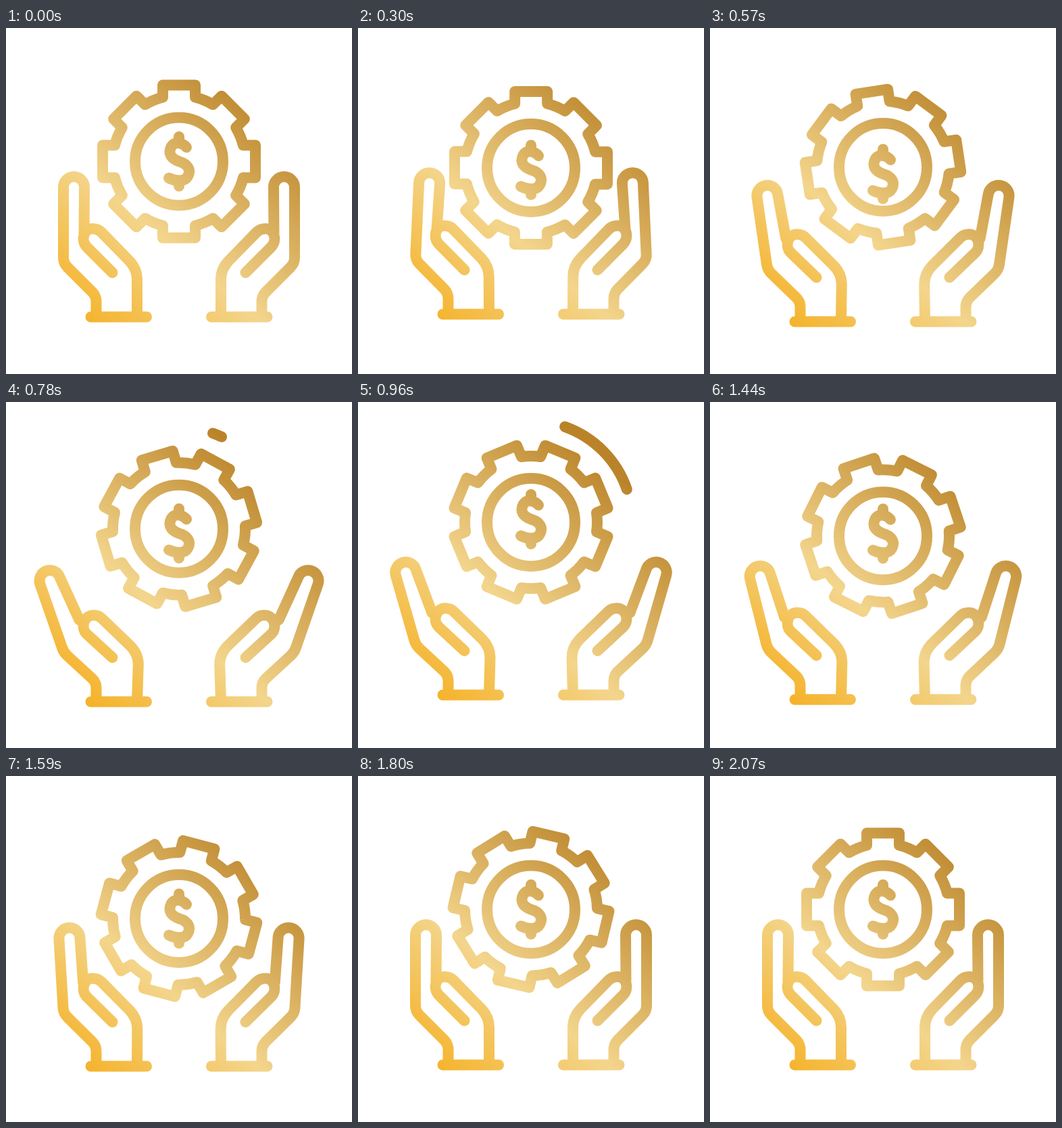
An HTML page with a canvas that plays this animation: 512 by 512 pixels, repeating every 2.25 s.

```html
<!DOCTYPE html>
<html lang="en">
<head>
<meta charset="utf-8">
<title>Hands tossing a coin gear</title>
<style>
html, body { margin: 0; width: 100%; height: 100%; overflow: hidden; background: #fff; }
canvas { display: block; }
</style>
</head>
<body>
<canvas id="stage" width="512" height="512"></canvas>
<script>
const ctx = document.getElementById('stage').getContext('2d');
const LOOP = 2250, STEP = 30, CX = 256, DEG = Math.PI / 180;

const gold = ctx.createLinearGradient(-166, 194, 110, -129);
gold.addColorStop(0, '#f5b32b');
gold.addColorStop(0.4, '#f3d58c');
gold.addColorStop(1, '#ba8329');

// Smooth curve through [time, value] keys without overshoot.
function track(keys) {
  const slope = i => (keys[i + 1][1] - keys[i][1]) / (keys[i + 1][0] - keys[i][0]);
  const tangent = i => {
    if (i === 0 || i === keys.length - 1) return 0;
    const a = slope(i - 1), b = slope(i);
    return a * b > 0 ? 2 * a * b / (a + b) : 0;
  };
  return t => {
    const last = keys.length - 1;
    if (t <= keys[0][0]) return keys[0][1];
    if (t >= keys[last][0]) return keys[last][1];
    const i = keys.findIndex(k => k[0] > t) - 1;
    const [t0, v0] = keys[i], [t1, v1] = keys[i + 1];
    const d = t1 - t0, u = (t - t0) / d, w = 1 - u;
    return v0 * w * w * (1 + 2 * u) + v1 * u * u * (3 - 2 * u)
      + d * u * w * (tangent(i) * w - tangent(i + 1) * u);
  };
}

const gearY = track([[160, 197.5], [300, 207], [420, 211], [570, 206], [690, 193.5],
  [960, 178], [1110, 170], [1230, 173], [1590, 211], [1800, 197.5]]);
const gearTurn = track([[290, 0], [570, 36.5], [960, 112.5], [1230, 195.5], [1590, 285], [2070, 360]]);
const dollarY = track([[160, 197.5], [300, 210], [480, 219], [570, 216], [960, 173.5],
  [1110, 163], [1230, 165], [1590, 211], [1800, 197.5]]);
const handDrop = track([[160, 0], [300, -4], [570, 7], [690, 19.5], [960, 6],
  [1230, 11], [1320, 19.5], [1590, 2], [1740, 0]]);
const handLean = track([[160, 0], [300, -0.17], [570, 0.52], [690, 1.25], [960, 0.99],
  [1230, 1.1], [1320, 1.25], [1590, 0.22], [1770, 0]]);
const arcHead = track([[750, 0], [900, 1]]);
const arcTail = track([[1020, 0], [1170, 1]]);

// Builds a path in moved coordinates, strokes it in stage coordinates.
function draw(x, y, build, flip = 1) {
  ctx.save();
  ctx.translate(x, y);
  ctx.scale(flip, 1);
  ctx.beginPath();
  build();
  ctx.restore();
  ctx.stroke();
}

function gear(turn) {
  const root = Math.asin(24 / 98);
  ctx.rotate(turn * DEG);
  for (let i = 0; i < 8; i++) {
    ctx.lineTo(-24, -95);
    ctx.lineTo(-24, -113);
    ctx.lineTo(24, -113);
    ctx.lineTo(24, -95);
    ctx.arc(0, 0, 98, root - Math.PI / 2, -Math.PI / 4 - root);
    ctx.rotate(Math.PI / 4);
  }
  ctx.closePath();
}

function dollar() {
  ctx.moveTo(0, -36.5);
  ctx.lineTo(0, -27);
  ctx.moveTo(11, -21);
  ctx.bezierCurveTo(6, -27, -6, -31, -11.5, -22);
  ctx.bezierCurveTo(-17, -11, -11, -4, 0, 0);
  ctx.bezierCurveTo(14, 4, 18, 13, 13, 22);
  ctx.bezierCurveTo(8, 31, -6, 29, -15, 24.5);
  ctx.moveTo(0, 28);
  ctx.lineTo(0, 36.5);
}

function hand(lean) {
  const p = (x, y) => [x, y + 0.07 * lean * Math.max(0, 160 - x)];
  const tilt = 16.5 * lean * DEG;
  const tipX = 100.5 - 30 * lean, tipY = 235.5 + 11 * lean;

  ctx.moveTo(125.5, 427.5);
  ctx.lineTo(208, 427.5);

  // Wrist, palm edge and fingers
  ctx.moveTo(133.5, 427.5);
  ctx.lineTo(...p(133.5, 405));
  ctx.quadraticCurveTo(...p(133.5, 397), ...p(128, 391));
  ctx.lineTo(...p(91, 354));
  ctx.quadraticCurveTo(...p(85, 348), ...p(85 - 2 * lean, 340));
  ctx.arc(tipX, tipY, 15.5, Math.PI - tilt, -tilt);
  ctx.lineTo(115.5 - 6 * lean, 303 + 3 * lean);

  // Thumb and the outer side of the wrist
  ctx.moveTo(...p(157.5, 362));
  ctx.lineTo(...p(119.5, 324));
  ctx.bezierCurveTo(...p(110, 314), ...p(115, 297), ...p(128, 297));
  ctx.quadraticCurveTo(...p(136, 297), ...p(141, 302));
  ctx.lineTo(183 + lean, 345);
  ctx.quadraticCurveTo(194 + 1.5 * lean, 357, 194 + 1.5 * lean, 372);
  ctx.lineTo(194, 427.5);
}

function render(t) {
  const y = gearY(t), drop = handDrop(t), lean = handLean(t);
  const head = arcHead(t), tail = arcTail(t);
  ctx.fillStyle = '#fff';
  ctx.fillRect(0, 0, 512, 512);
  ctx.strokeStyle = gold;
  ctx.lineWidth = 16;
  ctx.lineCap = ctx.lineJoin = 'round';

  draw(CX, y, () => gear(gearTurn(t)));
  draw(CX, y, () => ctx.arc(0, 0, 65, 0, 2 * Math.PI));
  draw(CX, dollarY(t), dollar);
  draw(0, drop, () => hand(lean));
  draw(512, drop, () => hand(lean), -1);
  if (head > tail) {
    const at = u => (-70.5 + 51.5 * u) * DEG;
    draw(CX, y, () => ctx.arc(0, 0, 150, at(tail), at(head)));
  }
}

const start = performance.now();
function tick() {
  const t = (performance.now() - start) % LOOP;
  render(Math.floor(t / STEP) * STEP);
  requestAnimationFrame(tick);
}
tick();
</script>
</body>
</html>
```
